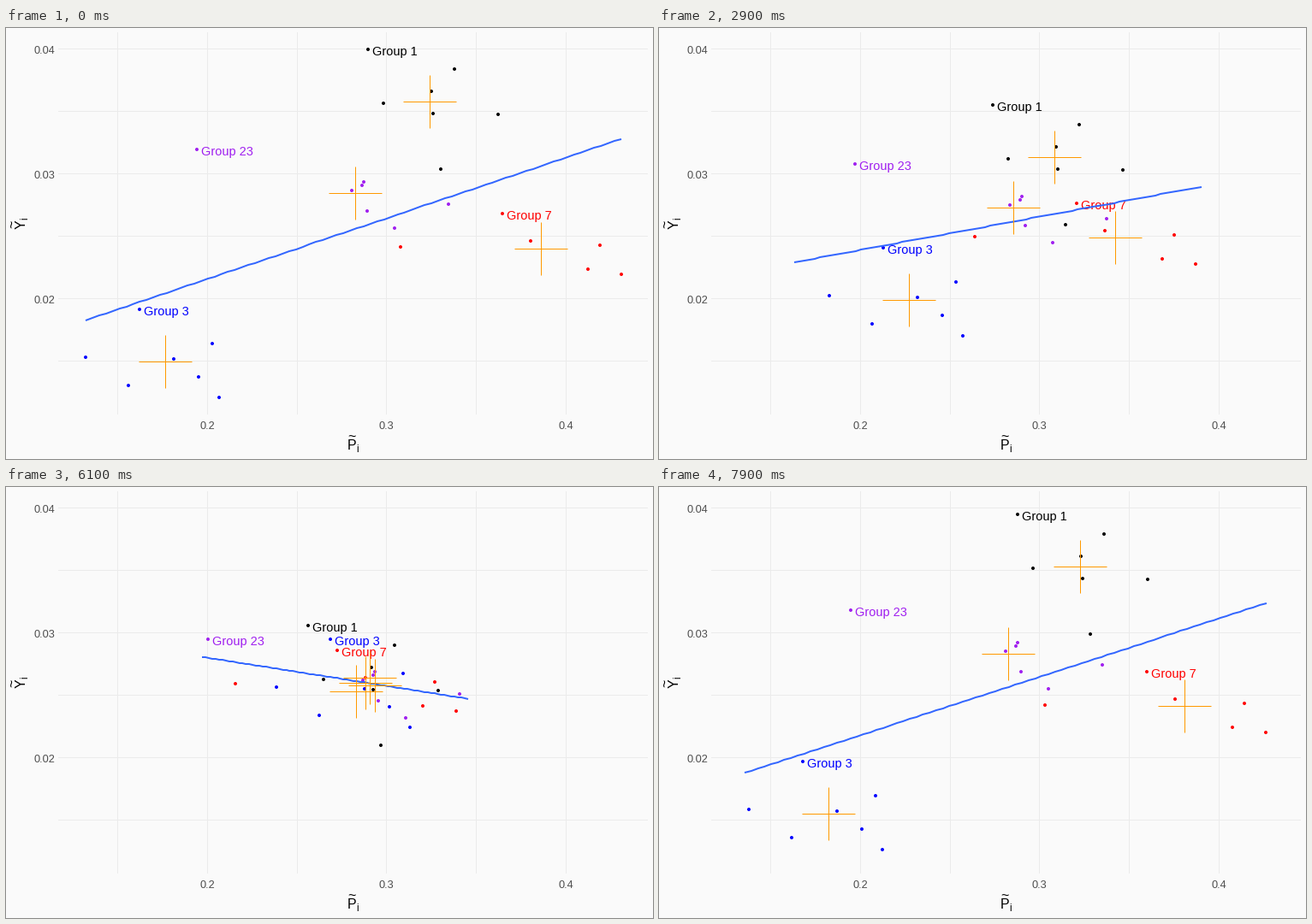
Write a matplotlib script that moves like this. It is 756 by 504 pixels and loops after 8000 ms.

```python
import numpy as np
import matplotlib.pyplot as plt
from matplotlib.animation import FuncAnimation
from matplotlib.collections import LineCollection

W, H, DPI = 756, 504, 72
FRAMES, INTERVAL = 80, 100
QUARTER = FRAMES // 4
ARM = 31

# Members of each group in pixels, the labelled one first; the means, the
# trend lines and all motion are worked out from these.
GROUPS = {
    "Group 1": ("black", "423,25 524,48 497,74 441,88 499,100 575,101 508,165"),
    "Group 3": ("blue", "156,329 93,385 143,418 196,387 241,369 225,408 249,432"),
    "Group 7": ("red", "580,217 461,256 613,249 694,254 680,282 719,288"),
    "Group 23": ("#a020f0", "223,142 418,180 416,184 404,190 422,214 517,206 454,234"),
}
NAMES = list(GROUPS)
COLORS = [color for color, _ in GROUPS.values()]
POINTS = [np.array([p.split(",") for p in text.split()], float)
          for _, text in GROUPS.values()]
MEANS = [p.mean(axis=0) for p in POINTS]
CENTER = np.concatenate(POINTS).mean(axis=0)


def place(t):
    """Every group shifted by the share t of its way to the common centre."""
    return [p + t * (CENTER - m) for p, m in zip(POINTS, MEANS)]


def fit_ends(groups):
    """Both ends of the least squares line through all points."""
    x, y = np.concatenate(groups).T
    ends = np.array([x.min(), x.max()])
    return np.column_stack([ends, np.polyval(np.polyfit(x, y, 1), ends)])


def progress(n):
    """Rest apart, move together, rest, move apart again."""
    up = np.clip((n - QUARTER) / QUARTER, 0, 1)
    down = np.clip((n - 3 * QUARTER) / QUARTER, 0, 1)
    return up - down


def snap(p):
    return np.floor(p + 0.5)


plt.rcParams["font.family"] = "Liberation Sans"
fig = plt.figure(figsize=(W / DPI, H / DPI), dpi=DPI, facecolor="#fafafa")
ax = fig.add_axes([0, 0, 1, 1])
ax.set(xlim=(0, W), ylim=(H, 0))
ax.axis("off")


def write(x, y, s, size, color="black", ha="left", rotation=0):
    return ax.text(x, y, s, size=size, color=color, ha=ha, va="baseline",
                   rotation=rotation, rotation_mode="anchor", zorder=3)


def draw_title(x, y, letter, upright):
    """A letter with a tilde above it and a subscript i."""
    for s, size, along, rise in ((letter, 16, 0, 0), ("~", 16, 1, 9),
                                 ("i", 11.5, 11, -3)):
        if upright:
            write(x - rise, y - along, s, size, rotation=90)
        else:
            write(x + along, y - rise, s, size)


def draw_axes():
    grid = []
    for k in range(6):
        x = np.floor(130.5 + 104.8 * k) + 0.5
        y = 24.5 + 73 * k
        grid += [[(x, 5), (x, 452)], [(61, y), (750, y)]]
        if k % 2:
            write(x, 469, f"{0.15 + 0.05 * k:.1f}", 12.8, "#4d4d4d", "center")
        else:
            write(57.5, y + 5.5, f"{0.04 - 0.005 * k:.2f}", 12.8,
                  "#4d4d4d", "right")
    ax.add_collection(LineCollection(grid, colors="#ebebeb", linewidths=1,
                                     snap=False, zorder=1), autolim=False)
    draw_title(398.5, 493, "P", upright=False)
    draw_title(22.5, 235, "Y", upright=True)


draw_axes()
TREND_APART, TREND_JOINED = fit_ends(place(0)), fit_ends(place(1))

dots = ax.scatter(*np.concatenate(POINTS).T, s=16, linewidths=0, zorder=2,
                  c=np.repeat(COLORS, [len(p) for p in POINTS]))
labels = [write(0, 0, name, 14.5, color)
          for name, color in zip(NAMES, COLORS)]
trend, = ax.plot([], [], color="#3366ff", lw=2, solid_capstyle="butt",
                 snap=False, zorder=4)
crosses = LineCollection([], colors="#ff9900", linewidths=1, snap=False,
                         zorder=5)
ax.add_collection(crosses, autolim=False)


def update(n):
    t = progress(n)
    groups = place(t)
    arms = []
    for points, label in zip(groups, labels):
        label.set_position(snap(points[0]) + (4.7, 7))
        x, y = snap(points.mean(axis=0)) + 0.5
        arms += [[(x - ARM, y), (x + ARM, y)], [(x, y - ARM), (x, y + ARM)]]
    dots.set_offsets(snap(np.concatenate(groups)))
    crosses.set_segments(arms)

    a, b = TREND_APART + t * (TREND_JOINED - TREND_APART)
    trend.set_data(*snap(np.linspace(a, b, 80)).T)
    return [dots, crosses, trend, *labels]


anim = FuncAnimation(fig, update, frames=FRAMES, interval=INTERVAL,
                     repeat=True, repeat_delay=0, blit=False)
plt.show()
```
